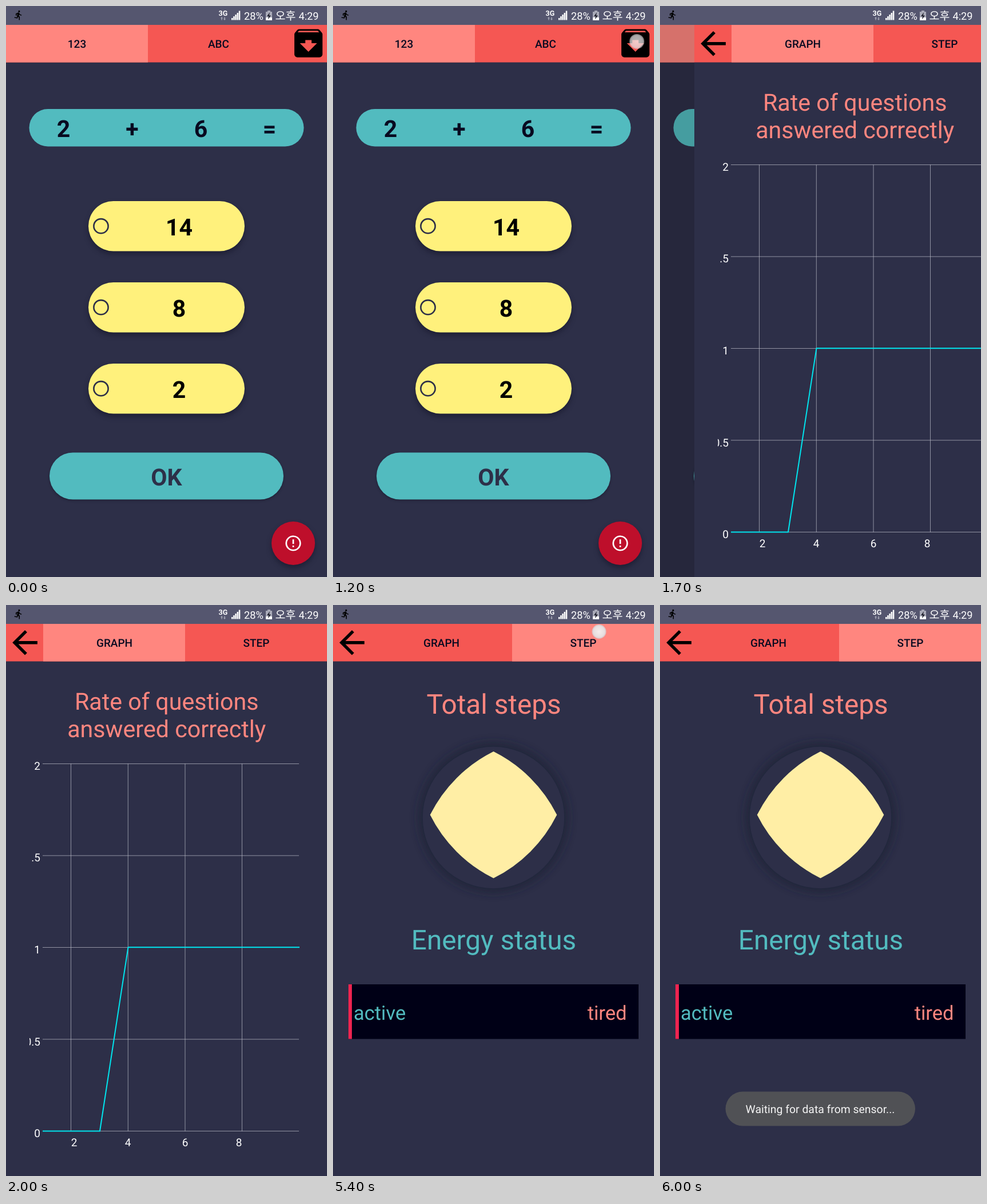
Recreate the animation shown at these times as an HTML page. Size 561 by 998 pixels, loop 8 s.

```html
<!DOCTYPE html>
<html lang="en">
<head>
<meta charset="utf-8">
<title>Math quiz and step counter</title>
<style>
html, body { margin: 0; width: 100%; height: 100%; overflow: hidden; background: #2d2f48; }
svg { display: block; width: 100vw; height: 100vh; }
text { font-family: Roboto, "Noto Sans", sans-serif; text-rendering: geometricPrecision; }

.bg { fill: #2d2f48; }
.teal { fill: #52bbbf; }
.coral { fill: #ff867f; }
.red { fill: #f55753; }
.mid { text-anchor: middle; }
.tab { font-size: 19px; font-weight: 500; fill: #080a20; text-anchor: middle; }
.num { font-size: 41px; font-weight: 700; text-anchor: middle; }
.title { font-size: 41.2px; }
.heading { font-size: 47.7px; }
.state { font-size: 34.5px; }
.axis { font-size: 19px; fill: #fff; }
.status { font-size: 18.2px; fill: #fff; }
.shadow { filter: drop-shadow(0 5px 5px rgba(10, 12, 28, .45)); }
.lift { filter: drop-shadow(0 2px 2px rgba(10, 12, 28, .4)); }

/* Every change lands on a 100 ms beat: 1.25% of the loop. */
.quiz, .dim, .report, .graph, .steps, .tap, .toast { animation: 8s step-end infinite; }
.quiz { animation-name: push; }
.dim { animation-name: dim; }
.report { animation-name: slide; }
.graph { animation-name: leave; }
.steps { animation-name: enter; }
.tap.open { animation-name: tap-open; }
.tap.step { animation-name: tap-step; }
.toast { animation-name: toast; }

@keyframes push {
  0% { transform: none; }
  20% { transform: translateX(-11px); }
  21.25% { transform: translateX(-17px); }
  22.5%, 100% { transform: translateX(-18.5px); }
}
@keyframes dim {
  0% { opacity: 0; }
  20% { opacity: .1; }
  21.25%, 100% { opacity: .16; }
}
@keyframes slide {
  0% { transform: translateX(580px); }
  20% { transform: translateX(242px); }
  21.25% { transform: translateX(60px); }
  22.5% { transform: translateX(14px); }
  23.75% { transform: translateX(3px); }
  25%, 100% { transform: none; }
}
@keyframes leave {
  0% { visibility: visible; }
  67.5%, 100% { visibility: hidden; }
}
@keyframes enter {
  0% { visibility: hidden; }
  67.5%, 100% { visibility: visible; }
}
@keyframes tap-open {
  0% { opacity: 0; }
  13.75% { opacity: .85; }
  15% { opacity: .75; }
  16.25%, 100% { opacity: 0; }
}
@keyframes tap-step {
  0% { opacity: 0; }
  66.25% { opacity: .9; }
  67.5% { opacity: .95; }
  68.75% { opacity: .35; }
  70%, 100% { opacity: 0; }
}
@keyframes toast {
  0% { opacity: 0; }
  71.25% { opacity: .2; }
  72.5% { opacity: .5; }
  73.75% { opacity: .8; }
  75%, 100% { opacity: 1; }
}
</style>
</head>
<body>
<svg viewBox="0 0 561 998" preserveAspectRatio="none">
  <defs>
    <radialGradient id="touch">
      <stop offset="0" stop-color="#f6f2f0"/>
      <stop offset=".8" stop-color="#e4e2e4"/>
      <stop offset="1" stop-color="#d0ced2" stop-opacity=".75"/>
    </radialGradient>
    <filter id="blur" x="-30%" y="-30%" width="160%" height="160%">
      <feGaussianBlur stdDeviation="8"/>
    </filter>
    <clipPath id="labels"><rect x="41" y="260" width="30" height="690"/></clipPath>
    <g id="option">
      <rect class="shadow" x="144" y="341" width="273" height="87.5" rx="43.7" fill="#fff17c"/>
      <circle cx="166" cy="384.7" r="12.6" fill="none" stroke="#2d2f48" stroke-width="2.6"/>
    </g>
    <path id="back" transform="translate(.3 33) scale(2.73)"
      d="M20 11H7.83l5.59-5.59L12 4l-8 8 8 8 1.41-1.41L7.83 13H20z"/>
  </defs>

  <rect class="bg" width="561" height="998"/>

  <g class="quiz">
    <rect class="bg" y="33" width="600" height="965"/>
    <rect class="red" y="33" width="561" height="65.5"/>
    <rect class="coral" y="33" width="248" height="65.5"/>
    <text class="tab" x="124" y="73">123</text>
    <text class="tab" x="371.5" y="73">ABC</text>
    <path transform="translate(495.8 32.3) scale(2.73)" fill-rule="evenodd"
      d="M20.54 5.23l-1.39-1.68C18.88 3.21 18.47 3 18 3H6c-.47 0-.88.21-1.16.55L3.46 5.23C3.17 5.57 3 6.02 3 6.5V19c0 1.1.9 2 2 2h14c1.1 0 2-.9 2-2V6.5c0-.48-.17-.93-.46-1.27zM12 17.5L6.5 12H10v-2h4v2h3.5zM5.12 5l.81-1h12l.94 1z"/>

    <rect class="teal" x="40.5" y="180" width="480" height="65.5" rx="32.7"/>
    <g class="num" fill="#080a20">
      <text x="100.5" y="229">2</text>
      <text x="220.5" y="229">+</text>
      <text x="340.5" y="229">6</text>
      <text x="460.5" y="229">=</text>
    </g>

    <use href="#option"/>
    <use href="#option" y="142"/>
    <use href="#option" y="284"/>
    <g class="num">
      <text x="302.5" y="401">14</text>
      <text x="302.5" y="543">8</text>
      <text x="302.5" y="685">2</text>
    </g>

    <rect class="teal lift" x="76" y="780.5" width="409" height="82" rx="41"/>
    <text class="num" x="280.5" y="838" fill="#2d2f48">OK</text>

    <circle class="shadow" cx="502" cy="939" r="38" fill="#be0f2b"/>
    <g transform="translate(502 939) scale(1.36)">
      <circle r="9" fill="none" stroke="#fff" stroke-width="2"/>
      <path d="M-1-5h2v6h-2zM-1 3h2v2h-2z" fill="#fff"/>
    </g>
    <rect class="dim" y="33" width="600" height="965"/>
  </g>
  <circle class="tap open" cx="531" cy="62" r="13" fill="url(#touch)"/>

  <g class="report">
    <rect class="bg" y="33" width="561" height="965"/>
    <rect class="red" y="33" width="561" height="65.5"/>

    <g class="graph">
      <rect class="coral" x="65" y="33" width="248" height="65.5"/>
      <g class="title coral mid">
        <text x="280.7" y="183">Rate of questions</text>
        <text x="280.7" y="231">answered correctly</text>
      </g>
      <path fill="none" stroke="#b9bac6" stroke-opacity=".8" stroke-width=".9"
        d="M64 277.5H512M64 438H512M64 598.5H512M64 759H512M64 919.5H512M113.5 277V920M213.3 277V920M313 277V920M412.5 277V920"/>
      <path fill="none" stroke="#00e5ee" stroke-width="2" stroke-linejoin="round"
        d="M64 919.5H164L213.5 598.2H513"/>
      <g class="axis" text-anchor="end" clip-path="url(#labels)">
        <text x="60" y="287.5">2</text>
        <text x="60" y="448">1.5</text>
        <text x="60" y="609">1</text>
        <text x="60" y="769.5">0.5</text>
        <text x="60" y="930">0</text>
      </g>
      <g class="axis mid">
        <text x="119" y="946">2</text>
        <text x="213" y="946">4</text>
        <text x="313" y="946">6</text>
        <text x="407" y="946">8</text>
      </g>
    </g>

    <g class="steps">
      <rect class="coral" x="313" y="33" width="248" height="65.5"/>
      <text class="heading coral mid" x="281" y="190">Total steps</text>
      <circle cx="280.5" cy="371.5" r="130" fill="#1f2036" opacity=".75" filter="url(#blur)"/>
      <circle class="bg" cx="280.5" cy="371.5" r="123.7"/>
      <path fill="#ffeea5"
        d="M280.5 256A247 247 0 0 1 391.3 366.8A247 247 0 0 1 280.5 477.6A247 247 0 0 1 169.7 366.8A247 247 0 0 1 280.5 256"/>
      <text class="heading teal mid" x="281" y="602">Energy status</text>
      <rect x="27" y="663" width="507" height="95.5" fill="#000016"/>
      <rect x="27" y="663" width="6" height="95.5" fill="#ee2450"/>
      <text class="state teal" x="36" y="725">active</text>
      <text class="state coral" x="513.5" y="725" text-anchor="end">tired</text>
    </g>

    <use href="#back"/>
    <text class="tab" x="189.5" y="73">GRAPH</text>
    <text class="tab" x="437.5" y="73">STEP</text>
  </g>

  <g class="toast">
    <rect x="114.5" y="850.5" width="331.5" height="60" rx="30" fill="#505155"/>
    <text class="mid" x="280" y="888" font-size="19.4" fill="#f4f4f4">Waiting for data from sensor...</text>
  </g>

  <g class="status">
    <rect width="561" height="33" fill="#55566f"/>
    <path transform="translate(12.4 6.7) scale(.78)" fill="#000"
      d="M13.49 5.48c1.1 0 2-.9 2-2s-.9-2-2-2-2 .9-2 2 .9 2 2 2zm-3.6 13.9l1-4.4 2.1 2v6h2v-7.5l-2.1-2 .6-3c1.3 1.5 3.3 2.5 5.5 2.5v-2c-1.9 0-3.5-1-4.3-2.4l-1-1.6c-.4-.6-1-1-1.7-1-.3 0-.5.1-.8.1l-5.2 2.2v4.7h2v-3.4l1.8-.7-1.6 8.1-4.9-1-.4 2z"/>
    <text x="371.5" y="17" font-weight="700" style="font-size:12.5px">3G</text>
    <path d="M377 19l2 2.5h-1.3v3h-1.4v-3H375zM382 25l-2-2.5h1.3v-3h1.4v3H384z" fill="#a9aab8"/>
    <path d="M394 21h2.5v3.5H394zM397.2 18h2.5v6.5h-2.5zM400.4 15h2.5v9.5h-2.5zM403.6 12h2.5v12.5h-2.5zM406.8 8.5h2.5v16h-2.5z"/>
    <text x="416" y="24">28%</text>
    <path d="M457 8h5v2h3v10h-11V10h3z" fill="#a9aab8"/>
    <path d="M454 20h11v5h-11z"/>
    <path d="M461 11l-5 7h3l-1 5.5 5-7h-3z" fill="#22232f"/>
    <text x="470.5" y="24" style="font:19.5px 'Noto Sans CJK KR','Noto Sans CJK',sans-serif">오후</text>
    <text x="546.5" y="24" text-anchor="end">4:29</text>
  </g>
  <circle class="tap step" cx="465" cy="46.5" r="12.5" fill="url(#touch)"/>
</svg>
</body>
</html>
```
